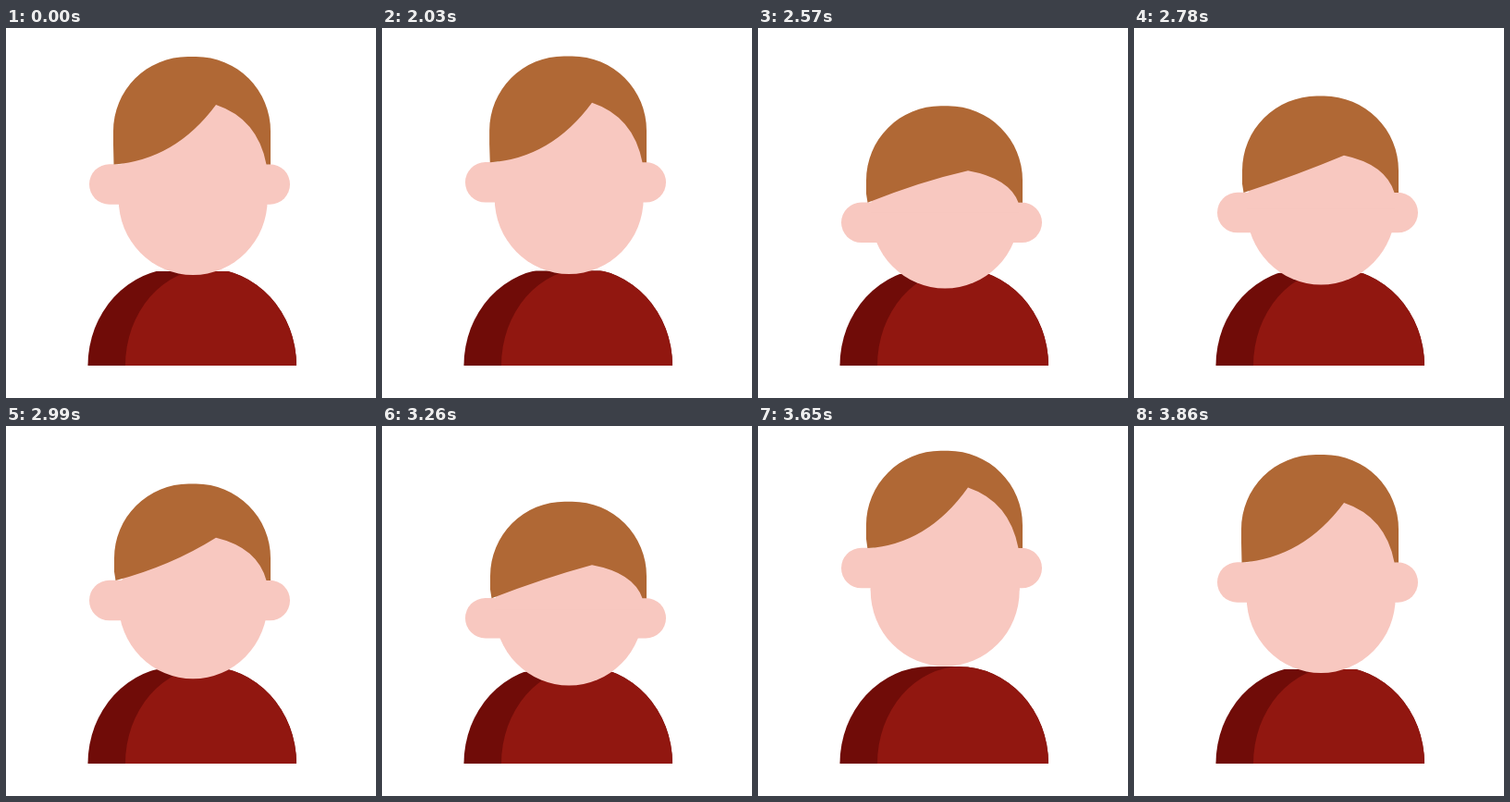
Recreate the animation shown at these times as an HTML page with a canvas. Size 400 px wide and 400 px high, loop 3.89 s.

```html
<!DOCTYPE html>
<html lang="en">
<head>
<meta charset="utf-8">
<title>Nodding figure</title>
<style>
html, body { margin: 0; width: 100%; height: 100%; overflow: hidden; background: #fff; }
canvas { display: block; }
</style>
</head>
<body>
<canvas id="stage" width="400" height="400"></canvas>
<script>
const ctx = document.getElementById('stage').getContext('2d');
const LOOP = 3890, START = 2030, STEP = 30;
const SKIN = '#f8c8c0', HAIR = '#b06835', SHIRT = '#911710', SHADE = '#700c08';

// time, vertical travel of the ears, share of the lifted pose
const KEYS = [
  [2000, 0, 0], [2230, -16.5, 1], [2580, 43, 1], [2975, 18.5, 1],
  [3320, 43, 1], [3635, -16.5, 1], [3860, 0, 0]
];

function poseAt(t) {
  const i = KEYS.findIndex(key => key[0] > t);
  if (i < 1) return [0, 0];
  const [a, b] = [KEYS[i - 1], KEYS[i]];
  const u = (t - a[0]) / (b[0] - a[0]);
  return [1, 2].map(n => a[n] + (b[n] - a[n]) * u);
}

function fill(color, build) {
  ctx.fillStyle = color;
  ctx.beginPath();
  build();
  ctx.fill();
}

function drawBody(neck) {
  ctx.save();
  ctx.beginPath();
  ctx.rect(0, neck, 400, 365 - neck);
  ctx.clip();
  const shoulders = (color, x, rx) => fill(color, () => {
    ctx.ellipse(x, 365, rx, 105, 0, Math.PI, Math.PI * 1.5);
    ctx.ellipse(217, 365, 97, 105, 0, -Math.PI / 2, 0);
  });
  shoulders(SHADE, 185.5, 97);
  shoulders(SHIRT, 220, 91);
  ctx.restore();
}

function drawHead(move, lift) {
  const ear = 169 + move;
  const bend = 7.6 * lift + 0.54 * move;
  const top = 31 + move + 12 * lift;
  const chin = 267 + 0.385 * move - 1.3 * lift;
  const hem = ear - 21.5;
  const peak = ear - 86 + bend;
  const side = 116 + lift;
  const corner = 116.5 + 2 * lift;

  fill(SKIN, () => ctx.roundRect(90, ear - 21.75, 217, 43.5, 21.75));
  fill(SKIN, () => ctx.ellipse(202.2, chin - 82, 80.5, 82, 0, 0, Math.PI * 2));
  // forehead, reaching under the hair
  fill(SKIN, () => {
    ctx.moveTo(121.7, chin - 82);
    ctx.lineTo(125, hem);
    ctx.lineTo(200, peak);
    ctx.lineTo(268, peak);
    ctx.lineTo(282.7, hem);
    ctx.lineTo(282.7, chin - 82);
  });
  fill(HAIR, () => {
    ctx.moveTo(corner, hem);
    ctx.lineTo(side, top + 95);
    ctx.lineTo(side, top + 81);
    ctx.arcTo(side, top, 197, top, 80.5);
    ctx.arcTo(286, top, 286, top + 81, 80.5);
    ctx.lineTo(286, hem);
    ctx.lineTo(281.5, hem);
    ctx.quadraticCurveTo(272, ear - 71 + 0.77 * bend, 227, peak);
    ctx.quadraticCurveTo(183 - 0.25 * bend, ear - 26.5 - 0.6 * bend, corner, hem);
  });
}

function frame(now) {
  const t = now % LOOP;
  const tick = START + Math.floor((t - START) / STEP) * STEP;
  const [move, lift] = poseAt(tick);
  ctx.clearRect(0, 0, 400, 400);
  drawBody(263 + 0.12 * move - 2 * lift);
  drawHead(move, lift);
  requestAnimationFrame(frame);
}
frame(performance.now());
</script>
</body>
</html>
```
